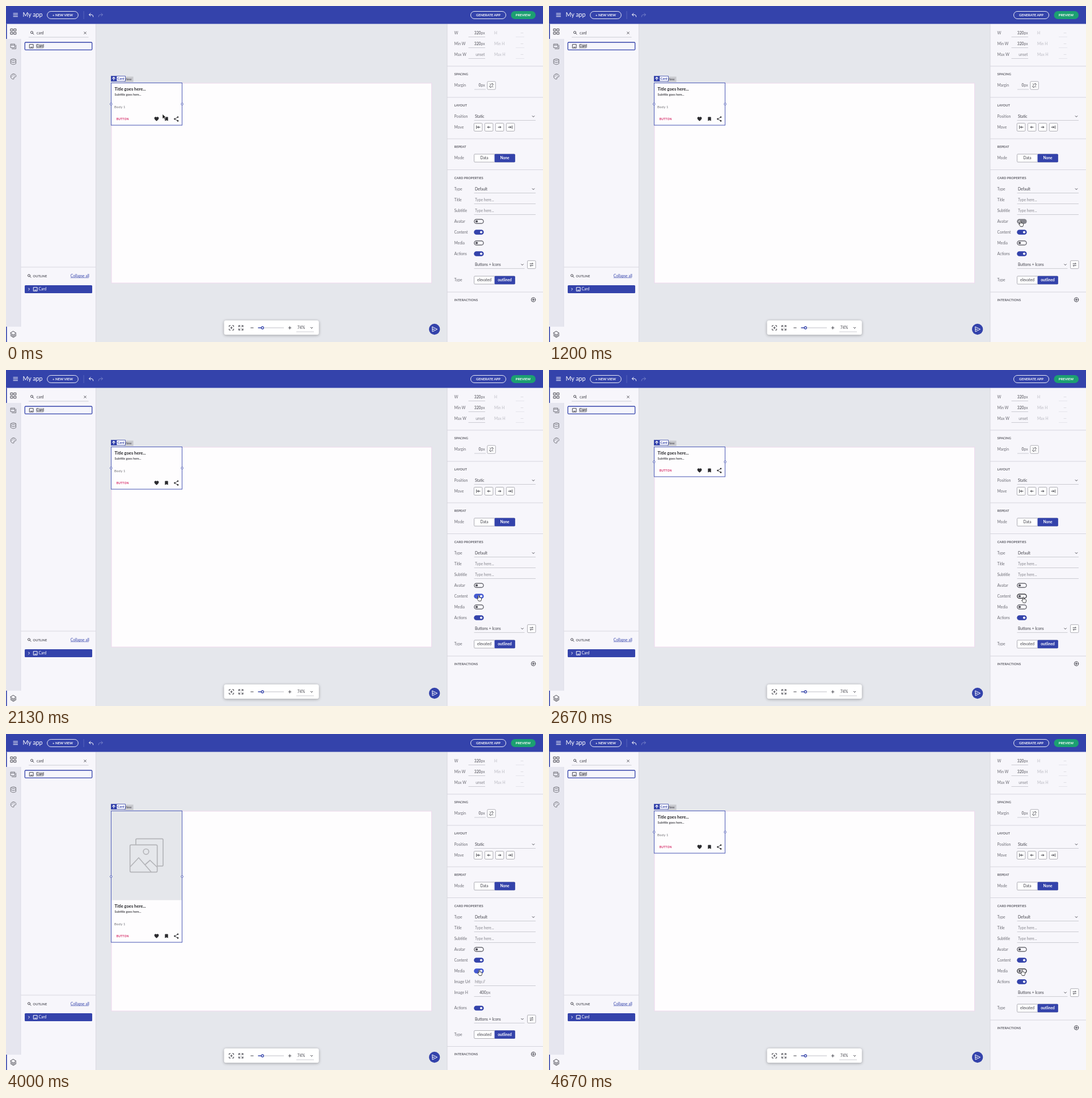
Animation of 947x592 px, one loop 4.74 s. Source, as an HTML page:

```html
<!DOCTYPE html>
<html lang="en">
<head>
<meta charset="utf-8">
<title>App builder card properties</title>
<style>
  html, body { margin: 0; width: 100%; height: 100%; overflow: hidden; background: #e5e7ec; }
  svg { display: block; width: 100vw; height: 100vh; font-family: Lato, "Open Sans", sans-serif; }
  text { font-size: 6.7px; fill: #42424a; white-space: pre; }
  .label { fill: #6c6c74; }
  .faint { fill: #bcbcc4; }
  .hint { fill: #85858d; }
  .head { font-size: 5.75px; font-weight: 700; fill: #5c5c64; }
  .white { fill: #fff; }
  .pill { font-size: 5.95px; font-weight: 700; fill: #fff; }
  .blue { fill: #3443ab; }
  .ic { fill: none; stroke: #45454d; stroke-width: 1; stroke-linecap: round; stroke-linejoin: round; }
</style>
</head>
<body>
<svg id="stage" viewBox="0 0 947 592" preserveAspectRatio="none"></svg>
<script>
const BLUE = '#3443ab', PANEL = '#f7f6fb', LINE = '#d5d5dd';
const LOOP = 4740;

// Markup helpers; text is placed by its vertical centre
const text = (x, y, s, cls = '', extra = '') =>
  `<text x="${x}" y="${y + 2.4}" class="${cls}" ${extra}>${s}</text>`;
const rect = (x, y, w, h, fill, extra = '') =>
  `<rect x="${x}" y="${y}" width="${w}" height="${h}" fill="${fill}" ${extra}/>`;
const icon = (d, extra = '') => `<path class="ic" d="${d}" ${extra}/>`;
const circle = (x, y, r, extra = '') => `<circle cx="${x}" cy="${y}" r="${r}" ${extra}/>`;
const group = (id, body) => `<g id="${id}">${body}</g>`;
const rule = (x1, x2, y, color = '#b9b9c1') => rect(x1, y - .35, x2 - x1, .7, color);
const separator = y => rect(778, y - .5, 169, 1, LINE);
const chevron = (x, y) => icon(`M${x - 1.8} ${y - .8}l1.8 1.8 1.8-1.8`);
const button = (x, y) => rect(x, y, 14.5, 14, '#fff', 'rx="1.5" stroke="#9b9ba3" stroke-width=".8"');
const right = 'text-anchor="end"';

const magnifier = (x, y) => icon(`M${x + 1} ${y + 1}l2 2`) +
  circle(x - .5, y - .5, 2, 'class="ic"');
const pixels = (label, y, value) => text(790.5, y, label, 'label') +
  text(837.5, y, value, '', right) + text(844.5, y, 'px', 'label', right);
const select = (y, value, end = 934) =>
  text(827, y, value) + rule(825.5, end, y + 7) + chevron(end - 4, y);
const input = (label, y, hint) =>
  text(790.5, y, label, 'label') + text(827, y, hint, 'hint') + rule(825.5, 934, y + 7);
const segmented = (y, left, active) =>
  rect(825.5, y - 7, 72, 14, '#fff', 'rx="1.5" stroke="#9b9ba3" stroke-width=".8"') +
  rect(861.5, y - 7.3, 36.3, 14.6, BLUE, 'rx="1.5"') +
  text(843.5, y, left, '', 'text-anchor="middle"') +
  text(879.5, y, active, 'white', 'text-anchor="middle" font-weight="700"');
const toggle = (label, y, id) => text(790.5, y, label, 'label') +
  `<g id="${id}">` + rect(825.8, y - 3.7, 16.2, 7.4, 'none', 'rx="3.7" stroke-width="1.2"') +
  circle(830, y, 2.1) + '</g>';

const header = rect(0, 0, 947, 31.5, BLUE) +
  icon('M13 13h7.5M13 15.8h7.5M13 18.6h7.5', 'style="stroke:#fff"') +
  text(29.5, 16.6, 'My app', 'white', 'style="font-size:10.7px"') +
  rect(72.7, 9.5, 54.6, 13, 'none', 'rx="6.5" stroke="#fff" stroke-width=".9"') +
  text(100, 16, '+ NEW VIEW', 'pill', 'text-anchor="middle"') +
  rect(136.7, 9, .7, 14, '#6874c2') +
  icon('M149 12.8l-2.5 2.5 2.5 2.5M146.8 15.3h4.4q2.6 .3 2.6 3.7', 'style="stroke:#fff"') +
  icon('M168 12.8l2.5 2.5-2.5 2.5M170.2 15.3h-4.4q-2.6 .3-2.6 3.7', 'style="stroke:#7580c8"') +
  rect(819.5, 9.5, 62, 13, 'none', 'rx="6.5" stroke="#fff" stroke-width=".9"') +
  text(850.5, 16, 'GENERATE APP', 'pill', 'text-anchor="middle"') +
  rect(890.5, 9, 43.5, 14, '#1ca071', 'rx="7"') +
  text(912, 16, 'PREVIEW', 'pill', 'text-anchor="middle"');

const square = (x, y) => `M${x} ${y}h3.6v3.6h-3.6z`;
const sidebar = rect(0, 31.5, 26, 561, '#e6e6ef') + rect(26, 31.5, 132.5, 561, PANEL) +
  rect(25.7, 58, .6, 507, LINE) + rect(158, 31.5, .8, 561, LINE) +
  rect(0, 31.5, 26, 26.5, PANEL) + rect(0, 31.5, 1.6, 26.5, BLUE) +
  rect(0, 565, 26, 27, PANEL) + rect(0, 565, 1.6, 27, BLUE) +
  icon([square(8.3, 40.3), square(14.2, 40.3), square(8.3, 46.2), square(14.2, 46.2)].join('')) +
  icon('M8.5 67h7v6.5h-7zM8.5 69h7M17.5 69v6.5h-7', 'style="stroke:#77777f"') +
  icon('M8.5 94.5q4.5-3 9 0v7q-4.5 3-9 0zq4.5 3 9 0M8.5 98q4.5 3 9 0', 'style="stroke:#77777f"') +
  icon('M13 119.5a4.7 4.7 0 1 0 0 9.4q1.8-.3 1-2.2t1.5-1.6q2.3 .2 2.3-1.6-.5-4-4.8-4z', 'style="stroke:#77777f"') +
  [[10.4, 123.8], [12, 121.8], [14.5, 122]].map(([x, y]) => circle(x, y, .7, 'fill="#77777f"')).join('') +
  icon('M13 573.2l5 3.2-5 3.2-5-3.2zM8 578.6l5 3.3 5-3.3M8 580.7l5 3.3 5-3.3') +
  magnifier(46, 47) + text(54, 47.3, 'card') + rule(40, 145.5, 55) +
  icon('M137.8 45.8l3.4 3.4m0-3.4l-3.4 3.4') +
  rect(33.3, 64, 118.4, 13.4, '#f5f5fc', `rx="1.5" stroke="${BLUE}" stroke-width="1.3"`) +
  icon('M41.7 67.7h6.4v6.4h-6.4zM43.5 72.5h2.8') +
  rect(53, 67, 13.2, 8, '#c5c5cb') + text(53.2, 70.9, 'Card') +
  rect(26, 459.6, 132.5, .9, LINE) +
  magnifier(41, 475.4) + text(47.5, 475.3, 'OUTLINE', 'head') +
  text(113.8, 475.3, 'Collapse all', 'blue') + rect(113.8, 478.6, 32, .6, BLUE) +
  rect(33, 492, 119, 14, BLUE, 'rx="1.5"') +
  icon('M39.7 497.2l1.8 1.8-1.8 1.8', 'style="stroke:#fff"') +
  icon('M48.7 495.8h6.4v6.4h-6.4zM50.5 500.6h2.8', 'style="stroke:#fff"') +
  text(57.5, 499, 'Card', 'white');

const heart = 'M12 21.4C5 15 2 12.3 2 8.5a5.4 5.4 0 0 1 10-3.4 5.4 5.4 0 0 1 10 3.4C22 12.3 19 15 12 21.4z';
const bookmark = 'M17 3H7a2 2 0 0 0-2 2v16l7-3 7 3V5a2 2 0 0 0-2-2z';
const glyph = (x, d) => `<path transform="translate(${x - 4.7} 194.3) scale(.392)" d="${d}" fill="#2b2b2f"/>`;

const canvas = rect(159, 31.5, 619, 561, '#e5e7ec') +
  rect(186, 136, 564.5, 352, '#fefdfe', 'stroke="#f0d8ee" stroke-width="1"') +
  rect(208, 124.5, 16.6, 9.5, '#c8c9ce') + text(208.7, 129, 'View', '', 'style="font-size:5.8px"') +
  rect(185.5, 135.5, 125, 74.5, '#fefdfe', `id="frame" stroke="#5663ba" stroke-width="1.1"`) +
  group('image', rect(186, 136, 124, 156.7, '#e5e7eb') +
    '<g fill="#e5e7eb" stroke="#b4b5b9" stroke-width="1.7" stroke-linejoin="round">' +
    '<rect x="229" y="184.7" width="48" height="48" rx="2"/><rect x="218.7" y="195.3" width="48" height="48" rx="2"/>' +
    circle(247, 207.3, 4.8) + '<path fill="none" d="M219 234l15-16 22 25M245 230.5l9-8 12.5 12"/></g>') +
  group('cardHead', group('avatarIcon', circle(199.5, 151.2, 7.8, 'fill="#c9cacf"') +
      circle(199.5, 149, 2.4, 'fill="#6c6c74"') + '<path d="M194.8 156q0-3.6 4.7-3.6t4.7 3.6z" fill="#6c6c74"/>') +
    group('titles', text(191.5, 146.7, 'Title goes here...', '', 'style="font-size:7.6px;font-weight:700;fill:#222226"') +
      text(191.5, 155.3, 'Subtitle goes here...', '', 'style="font-size:5.4px;font-weight:700;fill:#4b4b50"'))) +
  group('cardBody', text(191, 177.9, 'Body 1', '', 'style="font-size:5.9px;letter-spacing:.25px;fill:#6c6c72"')) +
  group('cardActions', text(194.7, 199, 'BUTTON', '', 'style="font-size:4.9px;font-weight:700;letter-spacing:.28px;fill:#d42663"') +
    glyph(265.5, heart) + glyph(283, bookmark) +
    icon('M303 195.8l-5.6 3.3 5.6 3.3', 'style="stroke:#2b2b2f;stroke-width:.9"') +
    [[303, 195.8], [297.4, 199.1], [303, 202.4]].map(([x, y]) => circle(x, y, 1.3, 'fill="#2b2b2f"')).join('')) +
  group('handles', [185.3, 310.6].map(x => circle(x, 0, 1.7, `fill="#fff" stroke="${BLUE}" stroke-width=".9"`)).join('')) +
  rect(185, 123.2, 10, 9.8, BLUE) +
  icon('M190 130.6v-5M187.8 127.6l2.2-2.2 2.2 2.2', 'style="stroke:#fff;stroke-width:1.2"') +
  rect(195, 123.6, 15.5, 9, '#fff', `stroke="${BLUE}" stroke-width=".8"`) +
  text(196.6, 127.8, 'Card', 'blue', 'style="font-size:5.7px;font-weight:700"');

const toolbar = rect(384.5, 554, 167.3, 25.3, '#fff', 'rx="3.5" style="filter:drop-shadow(0 1px 2.5px #0005)"') +
  icon('M393.5 565v-2h2.3M399.2 563h2.3v2M401.5 569v2h-2.3M395.8 571h-2.3v-2M397.5 565.3v3.4M395.8 567h3.4') +
  icon('M410.5 565.4v-2.4h2.4M415.6 563h2.4v2.4M418 568.6v2.4h-2.4M412.9 571h-2.4v-2.4M410.5 563l2.5 2.5M418 563l-2.5 2.5M418 571l-2.5-2.5M410.5 571l2.5-2.5') +
  icon('M431.7 567h4.4M498.2 567h4.6M500.5 564.7v4.6') +
  rule(444.5, 490, 567, '#a5a5ae') + rect(444.5, 566.3, 8, 1.4, BLUE) +
  circle(452.3, 567, 2, `fill="#fff" stroke="${BLUE}" stroke-width="1.3"`) +
  text(513.7, 567, '74%', '', 'style="font-size:7px"') + rule(512, 543, 574) + chevron(539, 567) +
  circle(755.6, 569.5, 9.7, `fill="${BLUE}"`) +
  icon('M752 565.3l8.5 4.2-8.5 4.2v-4.2zM752 569.5h3.5', 'style="stroke:#fff"');

const arrows = [
  'M829.6 211v5M836 213.5h-4.5M833.2 211.7l-1.8 1.8 1.8 1.8',
  'M854 213.5h-4.8M851 211.7l-1.8 1.8 1.8 1.8',
  'M868 213.5h4.8M871 211.7l1.8 1.8-1.8 1.8',
  'M892.4 211v5M886 213.5h4.5M888.8 211.7l1.8 1.8-1.8 1.8'];
const sizeRow = (name, y) => rule(815.5, 845, y + 7) + text(861, y, name, 'faint') +
  text(912.5, y, '--', 'faint', right) + rule(899, 914, y + 7, '#dedee5');

const properties = rect(778, 31.5, 169, 561, PANEL) + rect(777.6, 31.5, .8, 561, LINE) +
  pixels('W', 47.5, '320') + sizeRow('H', 47.5) +
  pixels('Min W', 66.5, '320') + sizeRow('Min H', 66.5) +
  text(790.5, 85.5, 'Max W', 'label') + text(844.5, 85.5, 'unset', 'hint', right) + sizeRow('Max H', 85.5) +
  [106, 161, 234, 288.5].map(separator).join('') +
  text(790.5, 120, 'SPACING', 'head') + pixels('Margin', 140, '0') + rule(826, 846, 147) + button(848.8, 133) +
  icon('M855.2 138.2l1.6-1.5q2.2-.6 2.2 2l-1.3 1.5M856.8 141.8l-1.6 1.5q-2.2 .6-2.2-2l1.3-1.5M853.2 137.2l1 .8M857.8 142l1 .8') +
  text(790.5, 174.5, 'LAYOUT', 'head') + text(790.5, 194.5, 'Position', 'label') + select(194.5, 'Static') +
  text(790.5, 213.5, 'Move', 'label') + arrows.map((d, i) => button(825.3 + 19 * i, 206.5) + icon(d)).join('') +
  text(790.5, 248, 'REPEAT', 'head') + text(790.5, 268, 'Mode', 'label') + segmented(268, 'Data', 'None') +
  text(790.5, 302.5, 'CARD PROPERTIES', 'head') + text(790.5, 322.5, 'Type', 'label') + select(322.5, 'Default') +
  input('Title', 341.5, 'Type here...') + input('Subtitle', 360.5, 'Type here...') +
  toggle('Avatar', 379.5, 'avatar') + toggle('Content', 398.5, 'content') + toggle('Media', 417.5, 'media') +
  group('mediaRows', input('Image Url', 436.5, 'http://') + text(790.5, 455.5, 'Image H', 'label') +
    text(846.8, 455.5, '400', '', right) + text(854.3, 455.5, 'px', 'label', right) + rule(825.5, 855, 462.5)) +
  group('lowerRows', toggle('Actions', 436.5, 'actions') + select(455.7, 'Buttons + Icons', 914.5) + button(919.5, 448.7) +
    icon('M924 454.2h5.5l-1.5-1.5M929.5 457.2h-5.5l1.5 1.5') +
    text(790.5, 483, 'Type', 'label') + segmented(483, 'elevated', 'outlined') + separator(504) +
    text(790.5, 517.5, 'INTERACTIONS', 'head') +
    circle(930, 517.5, 3.7, 'class="ic"') + icon('M928 517.5h4M930 515.5v4'));

const pointers = group('pointer',
  '<path id="arrow" d="M0 0v8.2l2-1.8 1.4 3.2 1.4-.6-1.4-3.1h2.7z" fill="#111" stroke="#fff" stroke-width=".6"/>' +
  '<path id="hand" d="M-.9 5.6V.8q.9-1.5 1.8 0v3q1-.5 1.6 .2 1-.3 1.4 .5 1.2 0 1.2 1.2 0 2.6-1.2 4.4h-3.9q-1.2-2-2.9-3.9-.4-1.5 2-.6z" fill="#fff" stroke="#111" stroke-width=".8" stroke-linejoin="round"/>');

const stage = document.getElementById('stage');
stage.innerHTML = canvas + sidebar + properties + toolbar + header + pointers;
const $ = id => document.getElementById(id);
const show = (id, on) => $(id).style.display = on ? '' : 'none';
const shift = (id, x, y) => $(id).setAttribute('transform', `translate(${x} ${y})`);

// Pointer path: time, x, y
const path = [[70, 276, 190.5], [1070, 831.5, 378.5], [1870, 832, 379], [2130, 833.5, 397],
  [2300, 834, 397.5], [2530, 840, 401], [2670, 836.5, 400], [3130, 836, 399], [3530, 834.5, 415.5]];

function pointerAt(t) {
  const i = path.findIndex(p => p[0] > t);
  if (i <= 0) return (i ? path.at(-1) : path[0]).slice(1);
  const [a, b] = [path[i - 1], path[i]];
  const u = (t - a[0]) / (b[0] - a[0]), e = u * u * (3 - 2 * u);
  return [a[1] + (b[1] - a[1]) * e, a[2] + (b[2] - a[2]) * e];
}

function drawToggle(id, y, on, [px, py], pressed) {
  const [track, knob] = $(id).children;
  const hover = Math.abs(px - 834) < 9 && Math.abs(py - y) < 4.5;
  const color = on ? (hover ? '#4459d2' : BLUE) : pressed ? '#85858c' : hover ? '#19191d' : '#505058';
  track.setAttribute('stroke', color);
  track.setAttribute('fill', on || pressed ? color : PANEL);
  knob.setAttribute('cx', on ? 838 : 830);
  knob.setAttribute('fill', on ? '#fff' : pressed ? '#d2d2d7' : '#505058');
}

function draw(t) {
  const within = (a, b) => t >= a && t < b;
  const avatar = within(1260, 1800), content = !within(2330, 3060), media = within(3800, 4460);
  const at = pointerAt(t), drop = media ? 157 : 0, lift = content ? 0 : 22;
  const height = 74.5 + drop - lift;

  drawToggle('avatar', 379.5, avatar, at, within(1190, 1260));
  drawToggle('content', 398.5, content, at);
  drawToggle('media', 417.5, media, at);
  drawToggle('actions', 436.5, true, at);
  show('mediaRows', media);
  shift('lowerRows', 0, media ? 46.5 : 0);

  $('frame').setAttribute('height', height);
  show('image', media);
  show('avatarIcon', avatar);
  show('cardBody', content);
  shift('cardHead', 0, drop);
  shift('titles', avatar ? 22 : 0, 0);
  shift('cardBody', 0, drop);
  shift('cardActions', 0, drop - lift);
  shift('handles', 0, 135.5 + height / 2);

  const hand = at[0] > 824;
  shift('pointer', ...at);
  show('hand', hand);
  show('arrow', !hand);
}

function tick() {
  const step = Math.floor((performance.now() % LOOP + 4) * .015);
  draw(step * 1000 / 15);
  requestAnimationFrame(tick);
}
tick();
</script>
</body>
</html>
```
